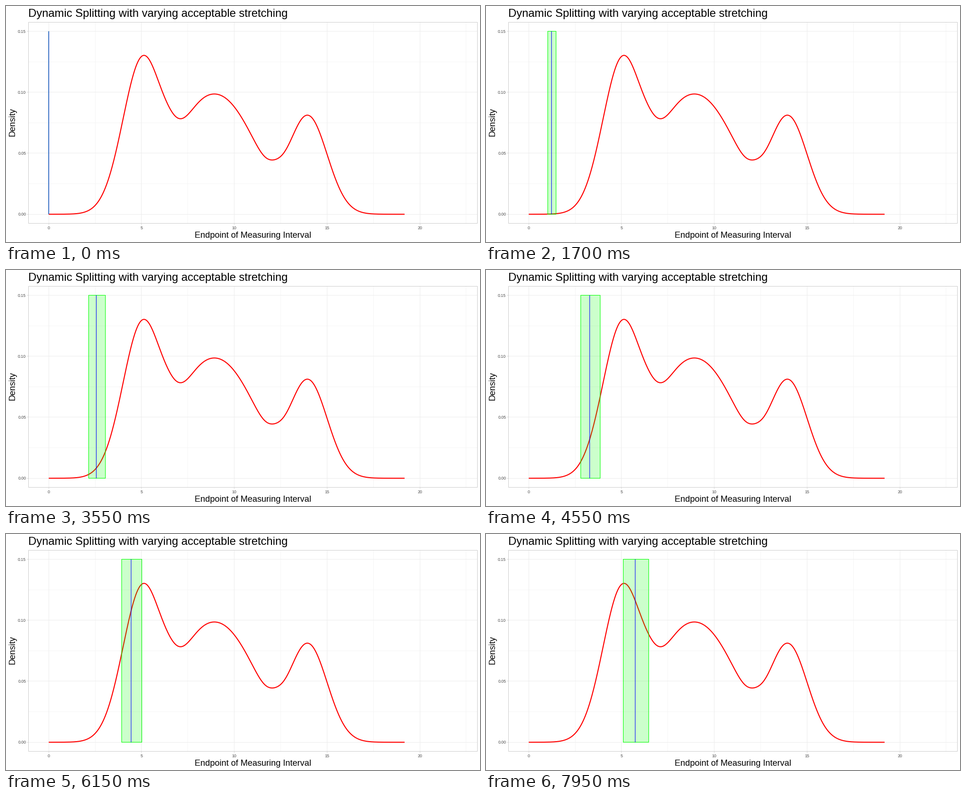
Write a matplotlib script that moves like this. It is 1000 by 500 pixels and loops after 8000 ms.

```python
import numpy as np
import matplotlib.pyplot as plt
from matplotlib.animation import FuncAnimation
from matplotlib.patches import Rectangle

W, H, DPI = 1000, 500, 100
FRAMES, INTERVAL = 160, 50
PT = 72 / DPI                     # points per pixel

X0, X_UNIT = 90.2, 39.14          # pixel of x = 0, pixels per unit
Y0, Y_TOP, D_TOP = 441.2, 53.5, 0.15
LEFT, RIGHT, TOP, BOTTOM = 47.5, 994.5, 34.5, 460.5
STEP = 1.4127 / X_UNIT            # slider advance per frame
MAX_STRETCH = 0.2
X_END = 19.18

# Density as a sum of bells: height, center, spread
BELLS = [
    (0.1265, 5.06, 1.07),
    (0.0040, 6.50, 0.45),
    (0.0810, 8.20, 1.25),
    (0.0070, 9.50, 0.75),
    (0.0585, 10.50, 1.20),
    (0.0040, 12.20, 0.40),
    (0.0803, 13.97, 1.04),
]

plt.rcParams["font.family"] = "Liberation Sans"


def px(x):
    return X0 + X_UNIT * x


def py(density):
    return Y0 - (Y0 - Y_TOP) * density / D_TOP


def density(x):
    return sum(a * np.exp(-((x - m) / s) ** 2 / 2) for a, m, s in BELLS)


fig = plt.figure(figsize=(W / DPI, H / DPI), dpi=DPI, facecolor="white")
ax = fig.add_axes([0, 0, 1, 1])
ax.set_xlim(0, W)
ax.set_ylim(H, 0)
ax.axis("off")


def line(xs, ys, color, width, z):
    return ax.plot(xs, ys, color=color, lw=width * PT, zorder=z, snap=False,
                   solid_capstyle="butt")[0]


def text(x, y, label, size, color="black", **kw):
    ax.text(x, y, label, fontsize=size * PT, color=color, va="baseline", **kw)


def pixel_center(v):
    return np.floor(v) + 0.5


def grid(xs, ys, color, z):
    for x in xs:
        line([pixel_center(px(x))] * 2, [TOP, BOTTOM], color, 1, z)
    for d in ys:
        line([LEFT, RIGHT], [pixel_center(py(d))] * 2, color, 1, z)


x_major, y_major = np.arange(0, 21, 5), np.arange(4) * 0.05
grid(x_major + 2.5, y_major[:3] + 0.025, "#f5f5f5", 1)
grid(x_major, y_major, "#ececec", 2)

for x in x_major:
    line([pixel_center(px(x))] * 2, [BOTTOM, BOTTOM + 3], "#d6d6d6", 1, 2)
    text(px(x), 473.2, str(x), 8.8, "#4d4d4d", ha="center")
for d in y_major:
    line([LEFT - 3, LEFT], [pixel_center(py(d))] * 2, "#d6d6d6", 1, 2)
    text(42.2, py(d) + 3.3, f"{d:.2f}", 8.8, "#4d4d4d", ha="right")

text(47, 23, "Dynamic Splitting with varying acceptable stretching", 23.75)
text(521, 491, "Endpoint of Measuring Interval", 18.1, ha="center")
text(18, 246, "Density", 18.1, ha="center", rotation=90,
     rotation_mode="anchor")

xs = np.linspace(0, X_END, 800)
line(px(xs), py(density(xs)), "#ff0000", 2.13, 3)
band = ax.add_patch(Rectangle(
    (X0, Y_TOP), 0, Y0 - Y_TOP, fc=(0, 1, 0, 0.2), ec=(0, 1, 0, 1),
    lw=1.07 * PT, zorder=4, snap=False, joinstyle="miter"))
marker = line([X0, X0], [Y_TOP, Y0], "#0000ff", 1.07, 5)
ax.add_patch(Rectangle((LEFT, TOP), RIGHT - LEFT, BOTTOM - TOP, fill=False,
                       ec="#cccccc", lw=PT, zorder=6, snap=False))


def update(frame):
    center = STEP * frame
    # Denser regions tolerate less stretching
    factor = 1 + MAX_STRETCH / (1 + 5 * density(center))
    low, high = px(center / factor), px(center * factor)
    band.set_x(low)
    band.set_width(high - low)
    marker.set_xdata([px(center)] * 2)
    return band, marker


anim = FuncAnimation(fig, update, frames=FRAMES, interval=INTERVAL,
                     repeat=True, repeat_delay=0, blit=False)
plt.show()
```
